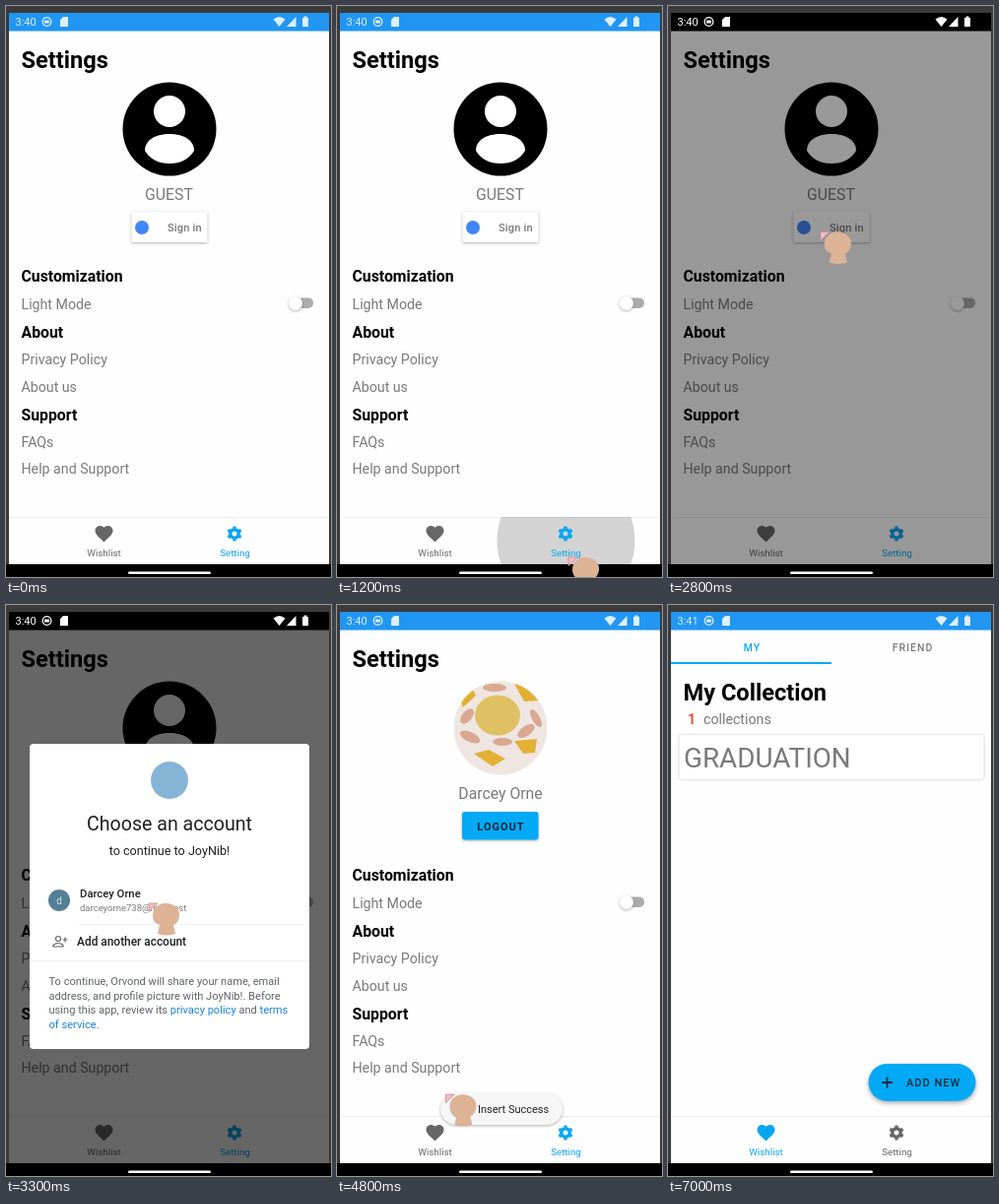
These frames come from a looping animation (330x580 px, 7100 ms). An HTML page:

```html
<!DOCTYPE html>
<html lang="en">
<head>
<meta charset="utf-8">
<title>Settings and wishlist demo</title>
<style>
  html, body { margin: 0; width: 100%; height: 100%; overflow: hidden; background: #3b3b3b; }
  svg { display: block; width: 330px; height: 580px; }
  text { font-family: Roboto, sans-serif; fill: #7a7a7a; white-space: pre; }
  .mid { text-anchor: middle; }
  .title { font-size: 23.6px; font-weight: 700; fill: #000; }
  .head { font-size: 15.8px; font-weight: 700; fill: #000; }
  .item { font-size: 14.2px; }
  .name { font-size: 15.8px; }
  .caps { font-size: 10.5px; font-weight: 500; letter-spacing: 1px; }
  .small { font-size: 11px; font-weight: 500; }
  .dark { fill: #202124; }
  .legal { font-size: 11.1px; fill: #5f6368; }
  .link { fill: #1a84d8; }
  .accent { fill: #03a9f4; }
  .raised { filter: drop-shadow(0 1px 1.5px rgba(0, 0, 0, .3)); }
  .card { filter: drop-shadow(0 .5px 1px rgba(0, 0, 0, .2)); }
  .tab { fill: #666; stroke: #666; }
  .tab text { font-size: 9.8px; fill: #666; stroke: none; }
  .tab.on { fill: #0aa5ef; stroke: #0aa5ef; }
  .tab.on text { fill: #0aa5ef; }
</style>
</head>
<body>
<svg viewBox="0 0 330 580">
  <defs>
    <clipPath id="navClip"><rect x="3" y="519" width="325" height="48"/></clipPath>
    <clipPath id="photoClip"><circle cx="166" cy="125" r="47.5"/></clipPath>
  </defs>

  <rect width="330" height="580" fill="#3b3b3b"/>
  <rect x="3" y="7" width="325" height="560" fill="#fefefe"/>

  <g id="settings">
    <text class="title" x="15.5" y="63">Settings</text>

    <g id="guest">
      <circle cx="166" cy="125" r="47.5"/>
      <circle cx="166" cy="107" r="16" fill="#fff"/>
      <path d="M141 147C141 136 152 130 166 130S191 136 191 147Q183 160 166 160T141 147Z" fill="#fff"/>
      <text class="name mid" x="165.5" y="197">GUEST</text>
      <rect class="raised" x="127.5" y="209" width="77" height="31" rx="1" fill="#fff"/>
      <circle cx="138" cy="225" r="7" fill="#4285f4"/>
      <text class="small" x="164" y="229" letter-spacing=".2">Sign in</text>
    </g>

    <g id="member">
      <g clip-path="url(#photoClip)">
        <rect x="118" y="77" width="96" height="96" fill="#efe6e1"/>
        <g fill="#d8a892">
          <ellipse cx="132" cy="113" rx="9" ry="5" transform="rotate(-50 132 113)"/>
          <ellipse cx="202" cy="115" rx="10" ry="4" transform="rotate(60 202 115)"/>
          <ellipse cx="135" cy="134" rx="11" ry="5" transform="rotate(25 135 134)"/>
          <ellipse cx="192" cy="128" rx="10" ry="5" transform="rotate(-35 192 128)"/>
          <ellipse cx="168" cy="139" rx="10" ry="4"/>
          <ellipse cx="160" cy="84" rx="12" ry="4"/>
        </g>
        <g fill="#e3b036">
          <path d="M180 80L195 84 206 97 190 98Z"/>
          <path d="M124 92L137 84 141 92 128 104Z"/>
          <path d="M139 151L154 147 171 156 158 164Z"/>
          <path d="M180 138L203 136 201 150 189 151Z"/>
        </g>
        <ellipse cx="163" cy="112" rx="23" ry="20.5" fill="#dfc065"/>
      </g>
      <text class="name mid" x="166" y="197">Darcey Orne</text>
      <rect class="raised accent" x="127" y="210" width="77.5" height="28.5" rx="3"/>
      <text class="caps mid" x="166.5" y="228.5" style="font-size:11px;font-weight:700;fill:#09233a">LOGOUT</text>
    </g>

    <text class="head" x="15.5" y="280">Customization</text>
    <text class="item" x="15.5" y="307.5">Light Mode</text>
    <rect x="291" y="296.5" width="21" height="10.5" rx="5" fill="#acacac"/>
    <circle class="raised" cx="294" cy="302" r="7" fill="#fff"/>
    <text class="head" x="15.5" y="336.5">About</text>
    <text class="item" x="15.5" y="364">Privacy Policy</text>
    <text class="item" x="15.5" y="391.5">About us</text>
    <text class="head" x="15.5" y="420.5">Support</text>
    <text class="item" x="15.5" y="448">FAQs</text>
    <text class="item" x="15.5" y="475">Help and Support</text>
  </g>

  <g id="wishlist">
    <text class="caps mid accent" x="85.5" y="47">MY</text>
    <text class="caps mid" x="248.5" y="47">FRIEND</text>
    <rect class="accent" x="3" y="58" width="163" height="2"/>
    <text class="title" x="15.5" y="97">My Collection</text>
    <text class="item" x="20" y="120.5" style="font-weight:700;fill:#e2512f">1</text>
    <text class="item" x="36" y="120.5">collections</text>
    <rect class="card" x="11.5" y="132" width="309" height="45" rx="2" fill="#fff" stroke="#f1f1f1"/>
    <text x="16" y="165" font-size="27.8">GRADUATION</text>
    <rect class="accent" x="203.5" y="466" width="109" height="38" rx="19" style="filter:drop-shadow(0 2px 2.5px #0005)"/>
    <path d="M217 485h11m-5.5-5.5v11" stroke="#0b2a40" stroke-width="1.8"/>
    <text class="caps" x="242" y="489.2" style="font-size:11px;fill:#0b2a40">ADD NEW</text>
  </g>

  <rect x="3" y="519" width="325" height="48" fill="#fefefe"/>
  <path d="M3 519.5H328" stroke="#eee"/>
  <g clip-path="url(#navClip)"><circle id="ripple" cy="543" fill="#000"/></g>
  <g class="tab" id="heartTab">
    <path transform="translate(88.7 525.2) scale(.9)" stroke="none" d="M12 21.35l-1.45-1.32C5.4 15.36 2 12.28 2 8.5 2 5.42 4.42 3 7.5 3c1.74 0 3.41.81 4.5 2.09C13.09 3.81 14.76 3 16.5 3 19.58 3 22 5.42 22 8.5c0 3.78-3.4 6.86-8.55 11.54z"/>
    <text class="mid" x="99.5" y="559">Wishlist</text>
  </g>
  <g class="tab" id="gearTab">
    <g fill="none">
      <circle cx="232" cy="536" r="4.2" stroke-width="3.4"/>
      <circle cx="232" cy="536" r="6.5" stroke-width="2.2" pathLength="12" stroke-dasharray="1" stroke-dashoffset="-.5"/>
    </g>
    <text class="mid" x="232.5" y="559">Setting</text>
  </g>

  <g id="toast">
    <rect class="raised" x="105" y="496" width="124" height="32" rx="16" fill="#f6f6f6"/>
    <circle cx="125" cy="512" r="9.5" fill="#86b4d6"/>
    <text class="dark" x="143" y="516" font-size="11">Insert Success</text>
  </g>

  <rect id="statusBar" x="3" y="7" width="325" height="18.5"/>
  <rect id="scrim" x="3" y="25" width="325" height="542"/>
  <g id="statusIcons" fill="#fff">
    <text id="clock" x="9.5" y="20" font-size="11" style="fill:#fff"></text>
    <circle cx="41.5" cy="16" r="4.3" fill="none" stroke="#fff" stroke-width="1.3"/>
    <path d="M39 14.5h5v3h-5zM55 14l3-3h5v10h-8zM271.5 13.5Q277.5 8.5 283.5 13.5L277.5 21ZM285 21L294.5 11V21ZM301 12h1.5v-1.5h3V12h1.5v9h-6Z"/>
  </g>

  <g id="dialog">
    <rect x="24" y="141" width="284" height="310" rx="4" fill="#fff"/>
    <circle cx="166" cy="178" r="19" fill="#86b4d6"/>
    <text class="mid dark" x="166" y="228.5" font-size="19.6">Choose an account</text>
    <text class="mid dark" x="166" y="254" font-size="12.6">to continue to JoyNib!</text>
    <circle cx="54" cy="300" r="11" fill="#557f94"/>
    <text class="mid" x="54" y="303.5" font-size="10" style="fill:#d5e4ec">d</text>
    <text class="small dark" x="75" y="297" style="font-size:11.3px">Darcey Orne</text>
    <text x="75" y="310.5" font-size="9.5">darceyorne738@mail.test</text>
    <path d="M72 324.5H308M24 361.5H308" stroke="#f3f3f3"/>
    <g fill="none" stroke="#5f6368" stroke-width="1.2">
      <circle cx="53" cy="339" r="2.5"/>
      <path d="M48 347v-1.5q5-4 10 0V347ZM57.5 340h5m-2.5-2.5v5"/>
    </g>
    <text class="small dark" x="72" y="345.5" style="font-size:11.9px">Add another account</text>
    <text class="legal" y="386"><tspan x="43.5">To continue, Orvond will share your name, email</tspan><tspan x="43.5" dy="14.5">address, and profile picture with JoyNib!. Before</tspan><tspan x="43.5" dy="14.5">using this app, review its <tspan class="link">privacy policy</tspan> and <tspan class="link">terms</tspan></tspan><tspan x="43.5" dy="14.5"><tspan class="link">of service</tspan>.</tspan></text>
  </g>

  <rect y="567" width="330" height="13"/>
  <rect x="124" y="574.5" width="84" height="2.5" rx="1.2" fill="#fff"/>

  <g id="cursor">
    <path d="M0 0H9L0 8.5Z" fill="#f3bcc0" stroke="#c48c90" stroke-width=".8"/>
    <path d="M17 0C26 0 32 6 31 13Q30 20 25 22L27 31Q17 34 9 31L11 22Q4 20 4 13C4 6 9 0 17 0Z" fill="#dcb395"/>
  </g>
</svg>

<script>
const LOOP = 7100, STEP = 100;
const SIGN_IN = 2500, SIGNED_IN = 3600, OPEN_WISHLIST = 5300;

// time, x, y of the pointer tip
const path = [
  [900, 235, 590], [1200, 235, 560], [1500, 235, 560], [2300, 156, 221],
  [2700, 156, 221], [3200, 145, 303], [3300, 145, 303], [3700, 148, 360],
  [4100, 148, 360], [5100, 100, 535], [5300, 100, 535], [5600, 99, 456],
  [6500, 99, 456]
];

const el = id => document.getElementById(id);
const show = (id, opacity) => { el(id).style.opacity = Number(opacity); };
const ramp = (t, from, to) => Math.min(1, Math.max(0, (t - from) / (to - from)));
const ease = k => k * k * (3 - 2 * k);

function pointerAt(t) {
  const i = path.findIndex(key => key[0] > t);
  if (i < 1) return null;
  const [t0, x0, y0] = path[i - 1], [t1, x1, y1] = path[i];
  const k = ease(ramp(t, t0, t1));
  return [x0 + (x1 - x0) * k, y0 + (y1 - y0) * k];
}

function drawRipple(t) {
  const onWishlist = t >= OPEN_WISHLIST;
  const start = onWishlist ? OPEN_WISHLIST : 1000;
  const ripple = el('ripple');
  ripple.setAttribute('cx', onWishlist ? 99.5 : 232.5);
  ripple.setAttribute('r', 70 * ramp(t, start - 100, start + 200));
  show('ripple', .17 * (1 - ramp(t, start + 200, start + 600)));
}

function draw(t) {
  const onWishlist = t >= OPEN_WISHLIST, member = t >= SIGNED_IN;
  show('settings', !onWishlist);
  show('wishlist', onWishlist);
  show('guest', !member);
  show('member', member);
  el('heartTab').classList.toggle('on', onWishlist);
  el('gearTab').classList.toggle('on', !onWishlist);

  const choosing = t >= SIGN_IN && t < SIGNED_IN;
  el('statusBar').setAttribute('fill', choosing ? '#000' : '#2196f3');
  show('statusIcons', choosing ? 1 : .85);
  show('scrim', .6 * ramp(t, 2600, 2900) * (1 - ramp(t, 3300, 3500)));
  show('dialog', t >= 2900 && t < 3400);
  show('toast', member ? 1 - ramp(t, 5300, 5500) : 0);
  el('clock').textContent = t < 6700 ? '3:40' : '3:41';
  drawRipple(t);

  const tip = pointerAt(t);
  show('cursor', tip !== null);
  if (tip) el('cursor').setAttribute('transform', `translate(${tip})`);
}

function tick() {
  const t = performance.now() % LOOP;
  draw(Math.floor(t / STEP) * STEP);
  requestAnimationFrame(tick);
}
tick();
</script>
</body>
</html>
```
